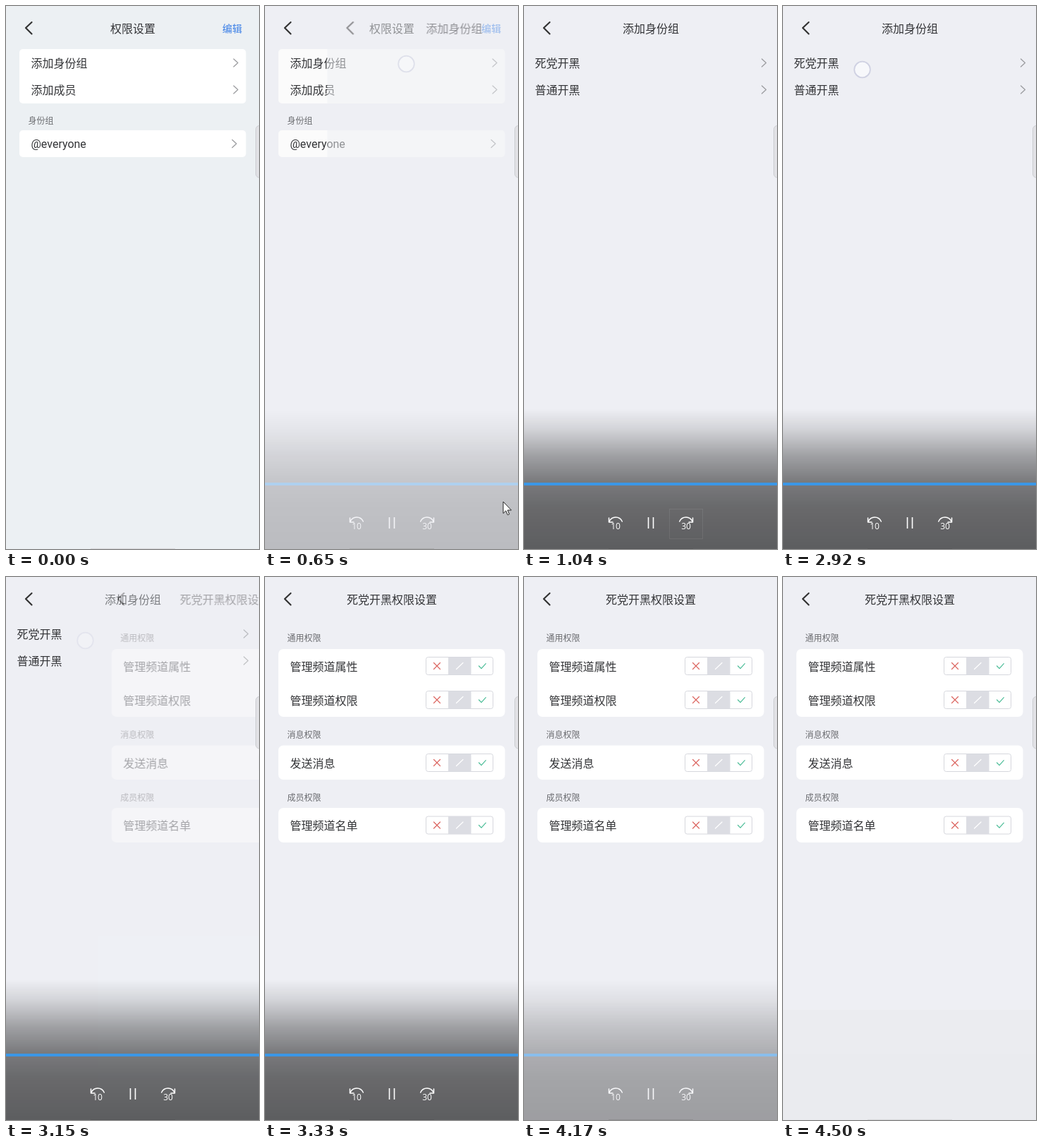
An HTML page for the animation above (8 s loop, 359 by 769 pixels).

```html
<!DOCTYPE html>
<html lang="zh-CN">
<head>
<meta charset="utf-8">
<title>权限设置</title>
<style>
html, body { margin: 0; width: 100%; height: 100%; overflow: hidden; background: #eeeff4; }
svg { display: block; width: 100vw; height: 100vh; }
text { font-family: "Noto Sans CJK SC", "Noto Sans CJK", sans-serif; font-size: 16px; fill: #333437; }
.mid { text-anchor: middle; }
.small { font-size: 12px; fill: #6b6c70; }
.edit { font-size: 14px; fill: #3b7fe6; }
.latin { font-family: Roboto, sans-serif; }
.num { font: 12px "Open Sans", sans-serif; fill: #fff; text-anchor: middle; }
.line { fill: none; stroke-linecap: round; stroke-linejoin: round; }
.card { fill: #fff; }

/* every animation shares one 8 s clock */
.a { animation: 8s linear infinite; }
#base { animation-name: base; }
#base-cards { animation-name: baseCards; }
#groups { animation-name: slide1, fade1; }
#rows { animation-name: rows; }
#perms { animation-name: slide2, fade2; }
#tap1 { animation-name: tap1; }
#tap2 { animation-name: tap2; }
#player { animation-name: player; }
#hover { animation-name: hover; }
#band { animation-name: band; }
#cursor { animation-name: move, show; }

@keyframes base { 0%, 6.25% { fill: #ecf0f3; } 7.5%, 100% { fill: #eeeff4; } }
@keyframes baseCards { 0%, 6.25% { fill: #fff; } 7.5%, 100% { fill: #fbfbfb; } }
@keyframes slide1 {
  0% { transform: translateX(359px); }
  6.375% { transform: translateX(359px); animation-timing-function: cubic-bezier(.333, .667, .667, 1); }
  9.875%, 100% { transform: none; }
}
@keyframes fade1 { 0%, 6.375% { opacity: 0; } 9.875%, 100% { opacity: 1; } }
@keyframes rows { 0%, 9.4% { opacity: 0; } 9.5%, 100% { opacity: 1; } }
@keyframes slide2 {
  0% { transform: translateX(359px); }
  38% { transform: translateX(359px); animation-timing-function: cubic-bezier(.333, .667, .667, 1); }
  41.5%, 100% { transform: none; }
}
@keyframes fade2 { 0%, 38% { opacity: 0; } 41.5%, 100% { opacity: 1; } }
@keyframes tap1 { 0%, 6.24% { opacity: 0; } 6.25%, 7.5% { opacity: 1; } 9%, 100% { opacity: 0; } }
@keyframes tap2 { 0%, 36.49% { opacity: 0; } 36.5%, 38.25% { opacity: 1; } 40%, 100% { opacity: 0; } }
@keyframes player {
  0%, 6.25% { opacity: 0; }
  8.125% { opacity: .35; }
  11.7%, 49.5% { opacity: 1; }
  52.125% { opacity: .56; }
  55.8%, 100% { opacity: 0; }
}
@keyframes hover { 0%, 11% { opacity: 0; } 12%, 36.4% { opacity: 1; } 36.5%, 100% { opacity: 0; } }
@keyframes band { 0%, 55% { opacity: 0; } 55.8%, 100% { opacity: 1; } }
@keyframes move {
  0%, 6.6% { transform: translate(350px, 694px); }
  7.9%, 8.6% { transform: translate(338px, 702px); }
  11%, 100% { transform: translate(252px, 734px); }
}
@keyframes show { 0%, 6.6% { opacity: 0; } 6.61%, 10.8% { opacity: 1; } 10.81%, 100% { opacity: 0; } }
</style>
</head>
<body>
<svg viewBox="0 0 359 769" preserveAspectRatio="none">
  <defs>
    <linearGradient id="shade" x1="0" y1="0" x2="0" y2="1">
      <stop offset="0" stop-opacity="0"/>
      <stop offset=".14" stop-opacity=".11"/>
      <stop offset=".34" stop-opacity=".335"/>
      <stop offset=".52" stop-opacity=".49"/>
      <stop offset=".7" stop-opacity=".56"/>
      <stop offset="1" stop-opacity=".61"/>
    </linearGradient>
    <path id="back" class="line" d="M36.5 23L28 31l8.500 8.500" stroke="#333" stroke-width="2.200"/>
    <path id="next" class="line" d="M-3-5.500L3 0l-6 5.500" stroke="#999a9d" stroke-width="1.200"/>
    <g id="switch">
      <rect x="228.500" y="-12.500" width="95" height="25" rx="3" fill="#fff" stroke="#d6d7dd"/>
      <path d="M260-12.500h32.500v25H260z" fill="#dcdde3"/>
      <g class="line" stroke-width="1.200">
        <path d="M239.500-4.500l9 9m0-9l-9 9" stroke="#dc6560"/>
        <path d="M271.500 4.500l9.500-9" stroke="#fff"/>
        <path d="M303.500 0l3.500 3.700 6.300-7" stroke="#4bbd97"/>
      </g>
    </g>
    <path id="skip" class="line" d="M-9.500-7v6h5.500M-9.300-1.500C-5.500-10 5.500-10 9.300-2" stroke="#fff" stroke-width="1.500"/>
    <circle id="tap" r="11.300" fill="#fafbfe" fill-opacity=".75" stroke="#cfd1e2" stroke-width="1.800"/>
  </defs>

  <g>
    <rect id="base" class="a" width="359" height="769" fill="#ecf0f3"/>
    <g id="base-cards" class="a" fill="#fff">
      <rect x="19" y="61" width="321.500" height="77" rx="5"/>
      <rect x="19" y="176" width="321.500" height="38" rx="5"/>
    </g>
    <use href="#back"/>
    <text class="mid" x="180" y="38">权限设置</text>
    <text class="edit" x="307" y="37">编辑</text>
    <text x="35.500" y="87">添加身份组</text>
    <text x="35.500" y="125">添加成员</text>
    <text class="small" x="31.500" y="167">身份组</text>
    <text class="latin" x="35.500" y="201">@everyone</text>
    <use href="#next" x="326" y="80.500"/>
    <use href="#next" x="326" y="118.500"/>
    <use href="#next" x="324" y="195"/>
  </g>

  <g id="groups" class="a">
    <rect width="359" height="769" fill="#eeeff4"/>
    <use href="#back"/>
    <text class="mid" x="180" y="38">添加身份组</text>
    <g id="rows" class="a">
      <text x="15.500" y="87">死党开黑</text>
      <text x="15.500" y="125">普通开黑</text>
      <use href="#next" x="340.500" y="80.500"/>
      <use href="#next" x="340.500" y="118.500"/>
    </g>
  </g>

  <g id="perms" class="a">
    <rect width="359" height="769" fill="#eeeff4"/>
    <use href="#back"/>
    <text class="mid" x="180" y="38">死党开黑权限设置</text>
    <text class="small" x="31.500" y="91">通用权限</text>
    <rect class="card" x="19" y="102" width="321.500" height="96" rx="7"/>
    <text x="35.500" y="132.500">管理频道属性</text>
    <use href="#switch" y="126"/>
    <text x="35.500" y="180.500">管理频道权限</text>
    <use href="#switch" y="174"/>
    <text class="small" x="31.500" y="228">消息权限</text>
    <rect class="card" x="19" y="238.500" width="321.500" height="48.500" rx="7"/>
    <text x="35.500" y="269.500">发送消息</text>
    <use href="#switch" y="263"/>
    <text class="small" x="31.500" y="316.500">成员权限</text>
    <rect class="card" x="19" y="327" width="321.500" height="49" rx="7"/>
    <text x="35.500" y="358">管理频道名单</text>
    <use href="#switch" y="351.500"/>
  </g>

  <g id="band" class="a">
    <path d="M0 613h359v156H0z" fill="#ebecf0"/>
    <path d="M0 675h359v94H0z" fill="#eaebef"/>
  </g>
  <rect x="354.500" y="169.500" width="12" height="73.500" rx="5" fill="#e2e2e6" stroke="#cbccd0"/>
  <path d="M120 768h120v1H120z" fill="#d9dadd"/>

  <g id="tap1" class="a"><use href="#tap" x="200.500" y="82"/></g>
  <g id="tap2" class="a"><use href="#tap" x="112.500" y="90"/></g>

  <g id="player" class="a">
    <rect y="571" width="359" height="198" fill="url(#shade)"/>
    <path d="M0 675h359v4H0z" fill="#3b97e6"/>
    <rect id="hover" class="a" x="206.500" y="712.500" width="47" height="42" fill="none" stroke="#fff" stroke-opacity=".08"/>
    <use href="#skip" x="130" y="732"/>
    <text class="num" x="130" y="741">10</text>
    <path d="M176.500 724v16m7-16v16" stroke="#fff" stroke-width="1.600"/>
    <use href="#skip" transform="translate(230 732) scale(-1 1)"/>
    <text class="num" x="230" y="741">30</text>
  </g>

  <g id="cursor" class="a">
    <path d="M0 0v16.500l3.800-3.600 2.500 5.800 2.400-1-2.500-5.700h5.300z" fill="#fff" stroke="#222" stroke-linejoin="round"/>
  </g>
</svg>
</body>
</html>
```
